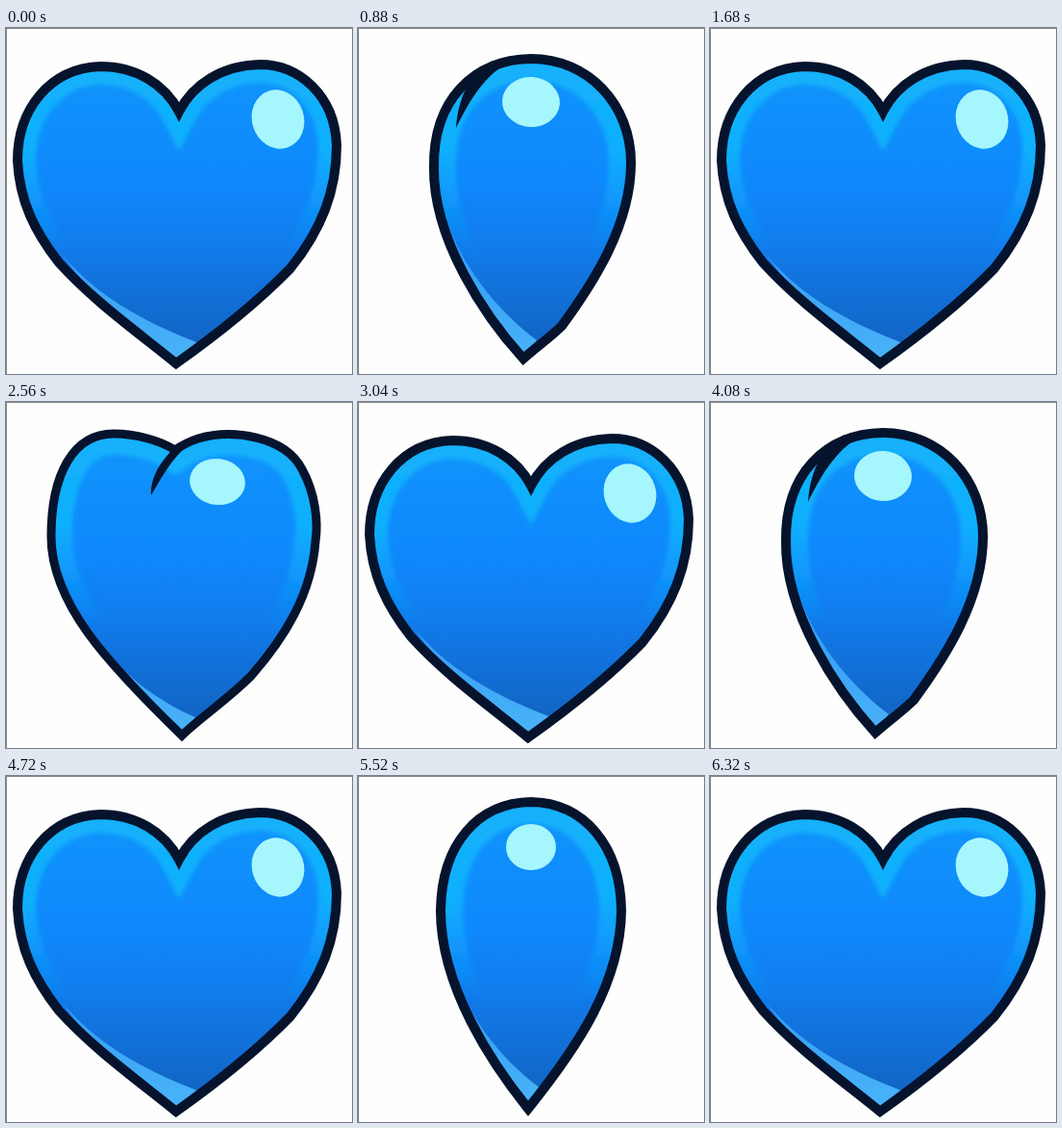
Write an HTML page that moves like this. It is 360 by 360 pixels and loops after 6400 ms.

```html
<!DOCTYPE html>
<html lang="en">
<head>
<meta charset="utf-8">
<title>Spinning heart</title>
<style>
  html, body { margin: 0; width: 100%; height: 100%; overflow: hidden; background: #fefefe; }
  svg { display: block; width: 100vw; height: 100vh; }
</style>
</head>
<body>
<svg id="stage" viewBox="0 0 360 360">
  <defs>
    <linearGradient id="body" gradientUnits="userSpaceOnUse" x1="0" y1="40" x2="0" y2="345">
      <stop offset="0" stop-color="#1094fc"/>
      <stop offset=".4" stop-color="#0f88fc"/>
      <stop offset=".6" stop-color="#117ced"/>
      <stop offset="1" stop-color="#1261bd"/>
    </linearGradient>
    <linearGradient id="rim" gradientUnits="userSpaceOnUse" x1="0" y1="40" x2="0" y2="235">
      <stop offset="0" stop-color="#14b0fb"/>
      <stop offset=".45" stop-color="#10b4fd" stop-opacity=".9"/>
      <stop offset="1" stop-color="#10a0fd" stop-opacity="0"/>
    </linearGradient>
    <linearGradient id="sheen" gradientUnits="userSpaceOnUse" x1="0" y1="200" x2="0" y2="340">
      <stop offset="0" stop-color="#2f94f4"/>
      <stop offset="1" stop-color="#48b2f8"/>
    </linearGradient>
    <filter id="soft"><feGaussianBlur stdDeviation="2.5"/></filter>
  </defs>
</svg>
<script>
const INK = '#06132c';
const STEP = 80;

// Each drawing: outline, line width, rim width, sheen, fold, glint [x, y, rx, ry, tilt]
const side = {
  line: 10, rim: 46,
  shape: 'M172 344C132 300 78 220 79 145C78 75 120 33 180 32C240 32 284 80 284 140C284 205 245 265 212 310C201 321 188 330 172 344Z',
  sheen: 'M92 200C108 245 140 290 186 325L172 342C135 302 102 250 92 200Z',
  fold: 'M102 104C104 76 114 48 140 34L156 36C132 50 118 72 102 104Z',
  glint: [180, 77, 30, 26, 4]
};

const poses = {
  front: {
    line: 10, rim: 38,
    shape: 'M180 87C165 58 135 40 98 40C45 42 12 85 12 138C14 180 30 212 55 244C90 283 135 315 177 349C215 322 262 285 296 250C328 210 344 170 344 122C342 70 305 38 264 38C225 39 195 58 180 87Z',
    sheen: 'M58 235C90 275 140 305 201 328L178 345C130 308 88 280 58 235Z',
    glint: [283, 95, 27, 31, -18]
  },
  left: {
    line: 9, rim: 42,
    shape: 'M178 348C150 318 105 285 75 240C50 205 35 160 35 120C35 75 70 36 118 35C145 35 170 42 187 54C200 42 220 35 238 35C285 35 313 70 313 120C312 185 285 230 250 270C225 302 205 325 178 348Z',
    sheen: 'M64 205C85 255 130 300 194 330L178 345C130 302 85 262 64 205Z',
    fold: 'M182 50L191 49C204 62 211 80 207 97C202 82 194 68 182 58Z',
    glint: [253, 119, 18, 17, -35]
  },
  leftSide: { ...side, flipFold: true, glint: [222, 108, 15, 16, -20] },
  edge: {
    line: 10, rim: 46,
    shape: 'M177 346C140 300 86 220 86 140C87 70 125 28 180 27C235 28 273 72 274 140C273 215 230 280 177 346Z',
    sheen: 'M98 200C112 245 145 292 190 325L177 342C140 302 108 250 98 200Z',
    glint: [180, 74, 26, 24, 0]
  },
  rightSide: side,
  right: {
    line: 9, rim: 44,
    shape: 'M176 50C160 40 135 33 112 33C70 33 47 75 47 140C47 170 60 205 85 240C110 275 150 315 183 347C200 330 230 310 255 285C290 245 318 200 322 145C325 125 322 95 308 70C290 35 235 28 200 38C191 41 183 45 176 50Z',
    sheen: 'M90 243C118 280 155 310 197 328L183 344C145 312 112 275 90 243Z',
    fold: 'M151 97C150 78 162 60 176 47L188 46C172 60 162 78 151 97Z',
    glint: [220, 83, 29, 24, 8]
  }
};

// Start of each drawing within a turn of 20 steps
const turn = [
  [0, 'front'], [4, 'left'], [6, 'leftSide'], [8, 'edge'],
  [10, 'rightSide'], [12, 'right'], [14, 'front']
];

function draw(name, p) {
  const [x, y, rx, ry, tilt] = p.glint;
  const flip = p.flipFold ? 'transform="matrix(-1 0 0 1 360 0)"' : '';
  const fold = p.fold ? `<path d="${p.fold}" fill="${INK}" ${flip}/>` : '';
  return `<clipPath id="clip-${name}"><path d="${p.shape}" ${flip}/></clipPath>
    <g id="${name}" visibility="hidden">
      <path d="${p.shape}" fill="url(#body)" ${flip}/>
      <g clip-path="url(#clip-${name})">
        <path d="${p.shape}" fill="none" stroke="url(#rim)" stroke-width="${p.rim}" filter="url(#soft)" ${flip}/>
        <path d="${p.sheen}" fill="url(#sheen)"/>
      </g>
      <path d="${p.shape}" fill="none" stroke="${INK}" stroke-width="${p.line}" stroke-linejoin="miter" ${flip}/>
      ${fold}
      <ellipse cx="${x}" cy="${y}" rx="${rx}" ry="${ry}" fill="#a6f6fe" transform="rotate(${tilt} ${x} ${y})"/>
    </g>`;
}

const stage = document.getElementById('stage');
stage.insertAdjacentHTML('beforeend',
  Object.entries(poses).map(([name, p]) => draw(name, p)).join('') +
  '<path d="M0 .5H360M.5 0V360" stroke="#8c8c8c"/>');

const groups = Object.keys(poses).map(name => document.getElementById(name));
const start = performance.now();

function tick() {
  const step = Math.floor((performance.now() - start) / STEP) % 20;
  const current = turn.filter(([from]) => from <= step).pop()[1];
  for (const g of groups) {
    g.setAttribute('visibility', g.id === current ? 'visible' : 'hidden');
  }
  requestAnimationFrame(tick);
}
tick();
</script>
</body>
</html>
```
